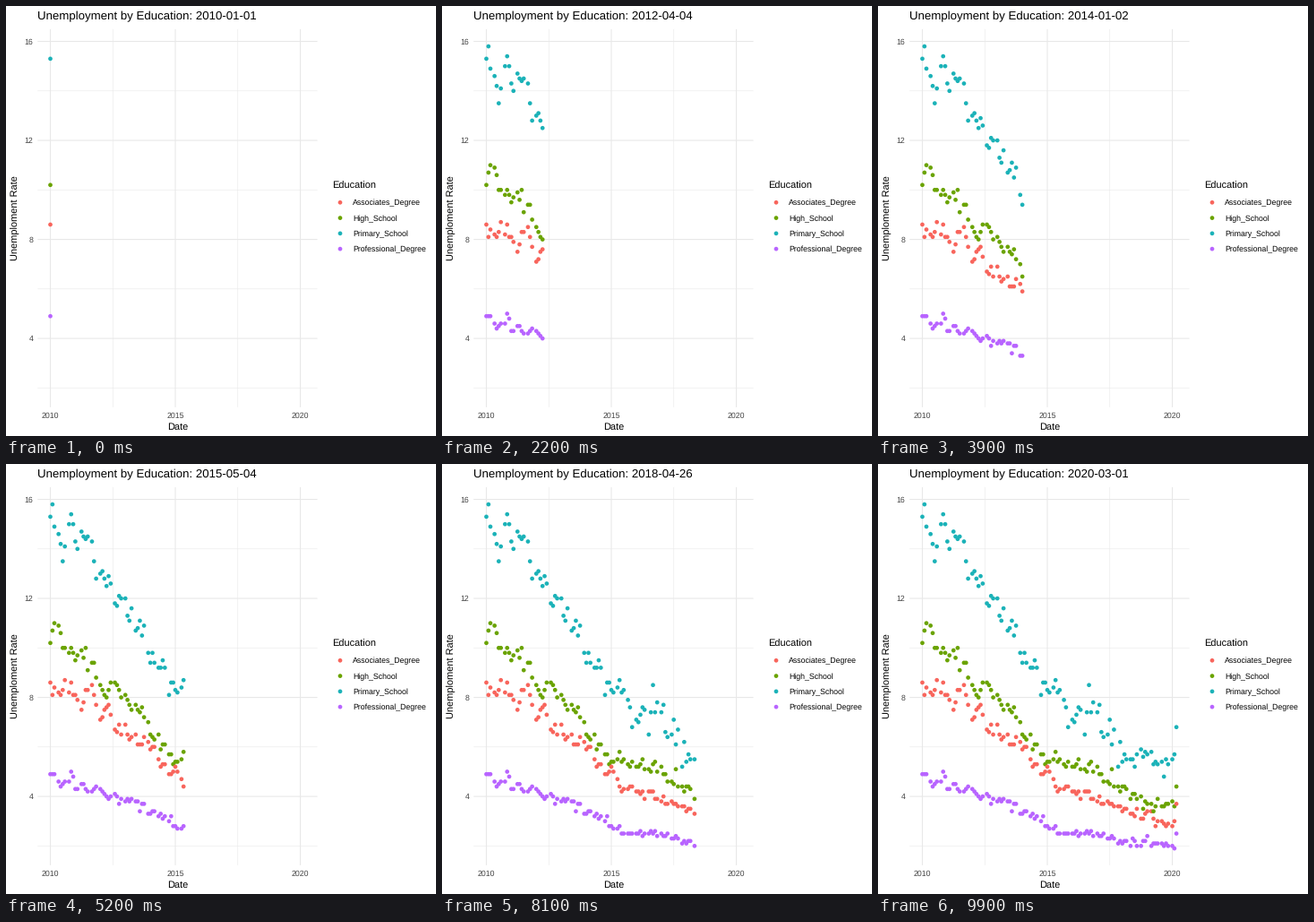
A matplotlib script that plays this animation: 480 by 480 pixels, repeating every 10000 ms.

```python
import numpy as np
import matplotlib.pyplot as plt
from matplotlib.animation import FuncAnimation

plt.rcParams["font.family"] = "Liberation Sans"
plt.rcParams["text.hinting"] = "none"

SIZE, DPI, FRAMES = 480, 72, 100  # at 72 dpi a point is a pixel
LEFT, RIGHT, TOP, BOTTOM = 35.3, 347.6, 25.9, 447.9
COLORS = ["#F8655C", "#6AA300", "#1BB2B8", "#B864FF"]
LABELS = ["Associates_Degree", "High_School", "Primary_School",
          "Professional_Degree"]

# Unemployment rates, one line per year, only the months that get a frame
associates = [
    8.6, 8.1, 8.4, 8.2, 8.1, 8.3, 8.7, 8.2, 8.6, 8.1,
    8.1, 7.9, 7.5, 7.8, 8.3, 8.3, 8.5, 8.1, 7.7,
    7.1, 7.2, 7.5, 7.6, 7.7, 7.3, 6.7, 6.6, 6.9, 6.5,
    6.9, 6.5, 6.3, 6.4, 6.5, 6.1, 6.1, 6.1, 6.4, 6.2,
    5.9, 6.0, 6.0, 5.5, 5.2, 5.3, 5.3, 4.9, 4.9, 5.0,
    5.2, 5.0, 4.7, 4.4, 4.2, 4.3, 4.3, 4.4, 4.4,
    4.2, 4.2, 4.1, 4.2, 3.9, 4.2, 4.2, 4.2, 3.9, 3.9,
    3.8, 4.0, 3.7, 3.7, 3.8, 3.7, 3.7, 3.6, 3.6, 3.6,
    3.4, 3.5, 3.5, 3.3, 3.3, 3.2, 3.5, 3.1, 3.1, 3.3,
    3.4, 3.4, 3.1, 2.8, 3.0, 3.0, 2.9, 2.8, 2.9,
    2.8, 3.0, 3.7]
high_school = [
    10.2, 10.7, 11.0, 10.9, 10.6, 10.0, 10.0, 9.8, 10.0, 9.8,
    9.5, 9.7, 9.9, 9.6, 10.0, 9.1, 9.4, 9.4, 8.8,
    8.5, 8.3, 8.1, 8.0, 8.3, 8.6, 8.6, 8.5, 8.3, 8.0,
    8.1, 7.9, 7.7, 7.5, 7.7, 7.5, 7.4, 7.6, 7.2, 7.0,
    6.5, 6.4, 6.3, 6.5, 5.9, 6.1, 6.1, 5.7, 5.7, 5.3,
    5.4, 5.4, 5.5, 5.8, 5.4, 5.5, 5.3, 5.2, 5.4,
    5.2, 5.2, 5.3, 5.5, 5.1, 5.1, 5.0, 5.3, 5.4, 5.0,
    5.2, 4.9, 4.9, 4.6, 4.6, 4.5, 5.1, 4.4, 4.4, 4.2,
    4.4, 4.4, 4.3, 3.9, 4.1, 4.1, 3.9, 4.0, 3.5, 3.8,
    3.7, 3.7, 3.4, 3.6, 3.9, 3.6, 3.6, 3.7, 3.7,
    3.8, 3.6, 4.4]
primary = [
    15.3, 15.8, 14.9, 14.6, 14.2, 13.5, 14.1, 15.0, 15.4, 15.0,
    14.3, 14.0, 14.7, 14.5, 14.4, 14.5, 14.3, 13.5, 12.8,
    13.0, 13.1, 12.8, 12.5, 12.9, 12.6, 11.8, 11.7, 12.1, 12.0,
    12.0, 11.3, 11.1, 11.6, 10.7, 10.8, 11.1, 10.5, 10.9, 9.8,
    9.4, 9.8, 9.4, 9.2, 9.2, 9.5, 9.2, 8.1, 8.6, 8.6,
    8.3, 8.2, 8.4, 8.7, 8.2, 8.3, 7.9, 7.6, 6.8,
    7.1, 7.0, 7.3, 7.6, 7.5, 6.5, 7.4, 8.5, 7.4, 7.8,
    7.4, 7.7, 6.6, 6.4, 6.5, 7.1, 6.1, 6.7, 5.2, 6.2,
    5.4, 5.7, 5.5, 5.5, 5.5, 5.2, 5.7, 5.9, 5.6, 5.8,
    5.7, 5.8, 5.3, 5.4, 5.3, 5.4, 4.8, 5.5, 5.3,
    5.5, 5.7, 6.8]
professional = [
    4.9, 4.9, 4.9, 4.6, 4.4, 4.5, 4.6, 4.6, 5.0, 4.8,
    4.3, 4.3, 4.5, 4.5, 4.3, 4.2, 4.2, 4.3, 4.4,
    4.3, 4.2, 4.1, 4.0, 3.9, 4.0, 4.1, 4.0, 3.7, 3.9,
    3.8, 3.9, 3.8, 3.9, 3.8, 3.8, 3.4, 3.7, 3.7, 3.3,
    3.3, 3.4, 3.4, 3.2, 3.3, 3.1, 3.2, 3.0, 3.2, 2.8,
    2.8, 2.7, 2.7, 2.8, 2.5, 2.5, 2.5, 2.5, 2.5,
    2.5, 2.5, 2.6, 2.4, 2.5, 2.5, 2.6, 2.5, 2.6, 2.4,
    2.5, 2.4, 2.4, 2.5, 2.3, 2.3, 2.4, 2.3, 2.1, 2.2,
    2.1, 2.2, 2.2, 2.0, 2.3, 2.2, 2.0, 2.0, 2.2, 2.2,
    2.4, 2.0, 2.1, 2.1, 2.1, 2.1, 2.0, 2.1, 2.0,
    2.0, 1.9, 2.5]

START = np.datetime64("2010-01-01")
months = np.arange("2010-01", "2020-04", dtype="datetime64[M]")
days = (months.astype("datetime64[D]") - START).astype(int)
SPAN = int(days[-1])


def px(day):
    return 49.5 + 0.0764 * day


def py(rate):
    return 481.6 - 27.63 * rate


# Each month snaps to its nearest frame; on a tie the earlier calendar month wins
slots = {}
for i in sorted(range(len(days)), key=lambda i: (i % 12, i)):
    slots.setdefault(round(days[i] / SPAN * (FRAMES - 1)), days[i])
xs = px(np.array([slots[k] for k in range(FRAMES)]))
rates = np.column_stack([associates, high_school, primary, professional])
points = np.column_stack([np.repeat(xs, 4), py(rates).ravel()])

fig = plt.figure(figsize=(SIZE / DPI, SIZE / DPI), dpi=DPI, facecolor="white")
ax = fig.add_axes([0, 0, 1, 1])
ax.set(xlim=(0, SIZE), ylim=(SIZE, 0))
ax.axis("off")


def text(x, y, s, size, color="black", **kw):
    return ax.text(x, y, s, fontsize=size, color=color, va="baseline", **kw)


def grid(day_marks, rate_marks, width):
    style = dict(color="#E8E8E8", lw=width, snap=False, zorder=1,
                 solid_capstyle="butt")
    for r in rate_marks:
        ax.plot([LEFT, RIGHT], [py(r)] * 2, **style)
    for d in day_marks:
        ax.plot([px(d)] * 2, [TOP, BOTTOM], **style)


def dots(xy):
    return ax.scatter(xy[:, 0], xy[:, 1], s=4.7 ** 2, c=COLORS * (len(xy) // 4),
                      linewidths=0, zorder=2)


grid([913, 2739], [2, 6, 10, 14], 0.55)
grid([0, 1826, 3652], [4, 8, 12, 16], 1.07)

for year, day in [(2010, 0), (2015, 1826), (2020, 3652)]:
    text(px(day), 460, year, 8.8, "#444444", ha="center")
for r in (4, 8, 12, 16):
    text(30.4, py(r) + 3.2, r, 8.8, "#444444", ha="right")

text((LEFT + RIGHT) / 2, 473, "Date", 11, ha="center")
text(13.4, (TOP + BOTTOM) / 2, "Unemploment Rate", 11, ha="center",
     rotation=90, rotation_mode="anchor")

text(364, 204, "Education", 11)
key_y = 219.3 + 17.28 * np.arange(4)
dots(np.column_stack([np.full(4, 373.0), key_y]))
for y, label in zip(key_y, LABELS):
    text(386.8, y + 3.3, label, 8.8)

title = text(35.3, 15, "", 13.2)
marks = dots(points)


def update(k):
    date = START + k * SPAN // (FRAMES - 1)
    title.set_text(f"Unemployment by Education: {date}")
    marks.set_offsets(points[:4 * (k + 1)])
    return title, marks


anim = FuncAnimation(fig, update, frames=FRAMES, interval=100, repeat=True,
                     repeat_delay=0)
plt.show()
```
